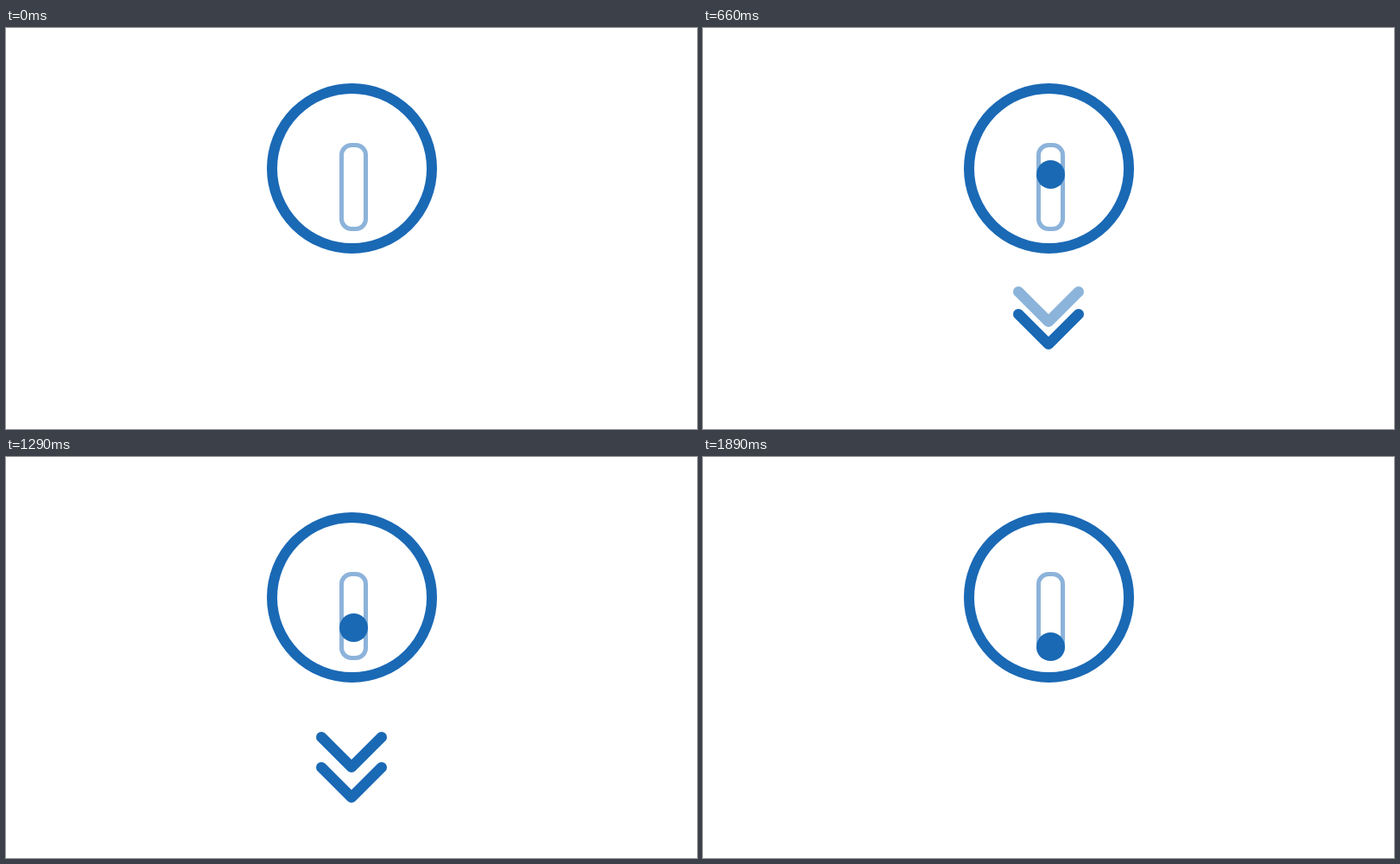
An HTML page that plays this animation: 800x464 px, repeating every 1.92 s.

```html
<!DOCTYPE html>
<html lang="en">
<head>
<meta charset="utf-8">
<title>Scroll down indicator</title>
<style>
  html, body { margin: 0; width: 100%; height: 100%; overflow: hidden; background: #fff; }
  svg { display: block; width: 800px; height: 464px; }

  :root { --blue: #1a69b5; --loop: 1920ms; }

  .ring { fill: none; stroke: var(--blue); stroke-width: 12; }
  .track { fill: none; stroke: var(--blue); stroke-width: 5; opacity: .5; }
  .ball { fill: var(--blue); }
  .chevron {
    fill: none; stroke: var(--blue); stroke-width: 12.4;
    stroke-linecap: round; stroke-linejoin: round;
  }

  .ball  { animation: travel var(--loop) infinite, appear var(--loop) infinite; }
  .lower { animation: travel var(--loop) infinite, lower-fade var(--loop) infinite; }
  .upper { animation: follow var(--loop) infinite, upper-fade var(--loop) infinite; }

  /* Every segment advances in 30 ms ticks. */
  @keyframes travel {
    0%        { transform: translateY(0);      animation-timing-function: steps(8); }
    12.5%     { transform: translateY(0);      animation-timing-function: steps(3); }
    17.1875%  { transform: translateY(2.8px);  animation-timing-function: steps(7); }
    28.125%   { transform: translateY(13.5px); animation-timing-function: steps(4); }
    34.375%   { transform: translateY(20px);   animation-timing-function: steps(8); }
    46.875%   { transform: translateY(31px);   animation-timing-function: steps(6); }
    56.25%    { transform: translateY(39px);   animation-timing-function: steps(7); }
    67.1875%  { transform: translateY(48px);   animation-timing-function: steps(8); }
    79.6875%  { transform: translateY(58px);   animation-timing-function: steps(3); }
    84.375%   { transform: translateY(61.3px); animation-timing-function: steps(9); }
    98.4375%, 100% { transform: translateY(70px); }
  }
  @keyframes follow {
    0%        { transform: translateY(-6px);  animation-timing-function: steps(26); }
    40.625%   { transform: translateY(-6px);  animation-timing-function: steps(4); }
    46.875%   { transform: translateY(-4px);  animation-timing-function: steps(6); }
    56.25%    { transform: translateY(4.5px); animation-timing-function: steps(7); }
    67.1875%  { transform: translateY(13px);  animation-timing-function: steps(8); }
    79.6875%  { transform: translateY(20px);  animation-timing-function: steps(4); }
    85.9375%, 100% { transform: translateY(22px); }
  }
  @keyframes appear {
    0% { opacity: 0; animation-timing-function: steps(8); }
    12.5%, 100% { opacity: 1; }
  }
  @keyframes lower-fade {
    0% { opacity: 0; animation-timing-function: steps(8); }
    12.5% { opacity: 1; }
    82.8125% { opacity: 1; animation-timing-function: steps(10); }
    98.4375%, 100% { opacity: 0; }
  }
  @keyframes upper-fade {
    0%, 28.125% { opacity: 0; animation-timing-function: steps(8); }
    40.625% { opacity: 1; }
    73.4375% { opacity: 1; animation-timing-function: steps(8); }
    85.9375%, 100% { opacity: 0; }
  }
</style>
</head>
<body>
<svg viewBox="0 0 800 464" aria-hidden="true">
  <circle class="ring" cx="400.5" cy="162.5" r="92.5"/>
  <rect class="track" x="388.5" y="135.5" width="28" height="97" rx="11.5"/>
  <circle class="ball" cx="402.5" cy="149.5" r="16.5"/>
  <path class="chevron upper" d="M365.2 311.2 L400 345.8 L434.8 311.2"/>
  <path class="chevron lower" d="M365.2 311.2 L400 345.8 L434.8 311.2"/>
</svg>
</body>
</html>
```
